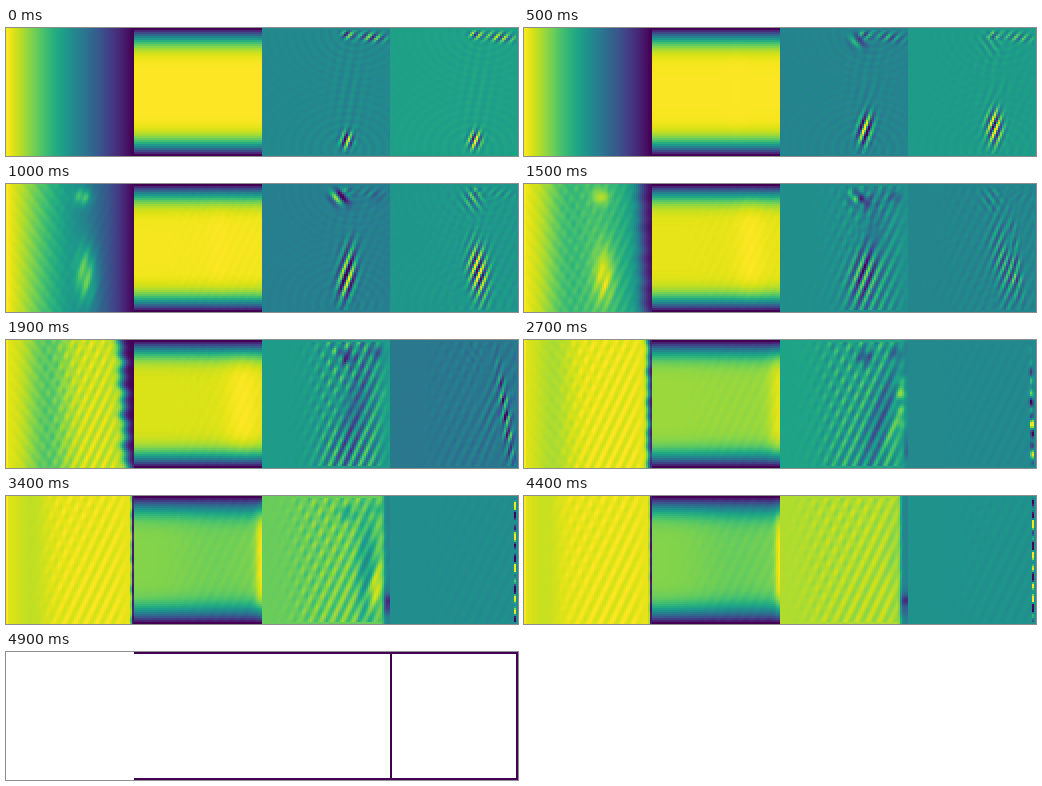
A matplotlib script for the animation above (5 s loop, 512 px wide and 128 px high).

```python
import numpy as np
import matplotlib.pyplot as plt
from matplotlib.animation import FuncAnimation

N = 64
FRAMES, INTERVAL = 50, 100
KEY_TIMES = [0, 1, 1.9, 2.7, 3.4, 4.4]
Y, X = np.mgrid[0:N, 0:N].astype(float)
WALL = np.minimum(Y, N - 1 - Y)
INNER = np.clip(WALL, 0, 1) * np.clip(np.minimum(X, N - 1 - X), 0, 1)


def key(t, *values):
    return np.interp(t, KEY_TIMES, values)


def blob(cx, cy, sx, sy, lean=0.0):
    across = (X - cx + lean * (Y - cy)) / sx
    return np.exp(-across**2 - ((Y - cy) / sy) ** 2)


def stripes(period, lean, phase=0.0):
    return np.sin(2 * np.pi * (X + lean * Y) / period + phase)


def step(edge, width):
    return 1 / (1 + np.exp(-np.clip((X - edge) / width, -40, 40)))


def erf_like(d):
    return np.tanh(1.128 * d + 0.1 * d**3)


def wobble(t):
    """Irregular variation down the rows, between about -1 and 1."""
    return 0.5 * (np.sin(0.37 * Y + 2 * t) + np.sin(0.83 * Y - t + 1))


def ripples(t):
    """Weak arcs from the two disturbed spots, and upright fringes between."""
    low = np.hypot(X - 42, 1.3 * (Y - 60))
    high = np.hypot(X - 46, 1.3 * (Y - 2))
    return (np.sin(1.3 * low - 2 * t) * np.exp(-low / 22)
            + np.sin(1.4 * high - 2 * t) * np.exp(-high / 20)
            + stripes(5, 0.2, -t) * blob(43, 32, 9, 28))


def streaks(t):
    """Long leaning lines that break into dots upstream and near the top."""
    main = stripes(key(t, 4.5, 4.5, 5, 5.2, 5.4, 5.6), 0.48, -1.2 * t)
    cross = stripes(8, -0.8, 0.8 * t)
    dotted = 1 - 0.85 * step(38 - 0.5 * (Y - 32), 5)
    return main * (1 - 0.4 * dotted * (1 - cross))


def pressure(t):
    start = 1 - X / (N - 1)
    edge = key(t, 60, 58, 58.5, 61.8, 62.4, 62.5)
    edge = edge + key(t, 0, 0, 1.2, 0.5, 0.2, 0.1) * wobble(t) \
        + key(t, 0, 0, 0.05, 0, 0, 0) * (Y - 32)
    dip = key(t, 0.3, 0.3, 0.22, 0.09, 0.06, 0.05) * np.exp(
        -((X - key(t, 22, 22, 20, 14, 12, 10)) / key(t, 10, 10, 11, 10, 9, 8)) ** 2)
    late = (0.965 - dip) * (1 - step(edge, key(t, 3, 3, 1.2, 0.7, 0.25, 0.2)))
    mix = np.interp(t, [0.9, 1.4, 1.9, 2.7], [0, 0.45, 0.94, 1])
    field = start + mix * (late - start)
    grow = np.interp(t, [0.6, 0.8, 1, 1.4, 1.9], [0, 0.1, 0.38, 0.35, 0])
    spot = blob(39.5, 45, 5, 14, 0) + 0.8 * blob(38, 6, 4, 4)
    field = field + grow * spot * (0.9 + 0.2 * stripes(5, 0.35, -t))
    faint = np.interp(t, [0.6, 1, 1.9, 2.7, 3.4], [0, 0.018, 0.02, 0.008, 0])
    field += faint * stripes(6, -0.8, t) * np.exp(-((X - 18) / 14) ** 2)
    amp = np.interp(t, [0.8, 1.9, 2.7, 3.4, 4.4], [0, 0.06, 0.04, 0.035, 0.035])
    field += amp * streaks(t) * step(20, 3) * (1 - step(edge - 5, 1.5))
    return np.where(X == 0, 1, field)


def stream(t):
    core = key(t, 1, 0.985, 0.945, 0.85, 0.815, 0.815)
    width = key(t, 9.5, 9.5, 9.3, 9.2, 9.5, 9.5)
    width = width + key(t, 0, 0, 0.3, 0.6, 1.2, 1.5) * X / N
    sag = key(t, 0, 0, 0, 0.005, 0.03, 0.045) * np.exp(-((X - 42) / 20) ** 2)
    bright = key(t, 0, 0.008, 0.05, 0.11, 0.17, 0.18) * np.exp(
        -((X - key(t, 42, 42, 54, 63, 63, 63)) / key(t, 5, 5, 9, 5, 2.8, 2)) ** 2)
    field = (core - sag + bright) * erf_like(WALL / width)
    amp = np.interp(t, [0.6, 1, 2.7, 4.4], [0, 0.005, 0.008, 0.011])
    return field + amp * streaks(t) * step(20, 4) * INNER


def cross_flow(t):
    base = key(t, 0.47, 0.43, 0.55, 0.58, 0.77, 0.88)
    cy, sy = key(t, 55.5, 45, 36, 34, 34, 34), key(t, 4.5, 14, 25, 28, 28, 28)
    packet = blob(42, cy, key(t, 3.4, 4.5, 9, 9, 9, 9), sy, 0.12)
    f = key(t, 0.58, 0.6, 0.12, 0, 0, 0) * packet * stripes(
        key(t, 4, 4.6, 5, 5, 5, 5), 0.4, -1.2 * t)
    f += key(t, 0.42, 0.12, 0, 0, 0, 0) * (
        blob(54, 4, 8, 2.5, -0.8) + blob(42, 3, 3, 2)) * stripes(5, 0.9, -2 * t)
    f += key(t, 0, 0.5, 0.1, 0, 0, 0) * blob(38, 6, 4.5, 4) * stripes(8, -0.8, 2.2)
    f += key(t, 0.04, 0.03, 0.012, 0.01, 0, 0) * ripples(t)

    # Wide streaks take over, then a dark band drifts to the outlet.
    spread = step(key(t, 36, 34, 28, 22, 17, 14), 4) * (1 - step(58, 2))
    f += key(t, 0, 0.02, 0.24, 0.17, 0.1, 0.055) * streaks(t) * spread
    band = blob(key(t, 42, 42, 46, 50, 52, 56), key(t, 32, 32, 36, 38, 38, 38),
                key(t, 4, 4, 6, 5.5, 4.5, 3), 28, key(t, 0.2, 0.2, 0.2, 0.28, 0, 0))
    f -= key(t, 0, 0, 0.2, 0.22, 0.24, 0.05) * band
    f -= key(t, 0, 0.12, 0.32, 0.3, 0.15, 0) * (
        blob(42, 8, 4, 4) + 0.7 * blob(57, 6, 3, 3))
    f += key(t, 0, 0, 0.06, 0.3, 0.05, 0) * blob(60, 29, 2.5, 13) * (
        0.6 + 0.6 * wobble(t))
    f += key(t, 0, 0, 0, 0.12, 0.28, 0.04) * blob(55.5, 46, 3, 10, 0.2)
    f *= np.clip(WALL, 0, 1) * np.clip(X, 0, 1)
    outlet = step(key(t, 63, 63, 63, 61.5, 60.4, 59.8), 0.4)
    f -= outlet * (key(t, 0, 0, 0, 0.1, 0.32, 0.43)
                   + key(t, 0, 0, 0, 0.2, 0.38, 0.35)
                   * blob(62, 53, 6, 5) * (0.8 + 0.3 * wobble(t)))
    return base + f


def divergence(t):
    base = key(t, 0.57, 0.53, 0.4, 0.47, 0.49, 0.51)
    packet = blob(key(t, 42, 43.5, 50, 55, 58, 60), key(t, 55.5, 43, 36, 34, 34, 34),
                  key(t, 3.4, 5, 6, 6, 5, 5), key(t, 4.5, 14, 25, 28, 28, 28),
                  key(t, 0.12, -0.1, -0.1, 0, 0, 0))
    f = key(t, 0.6, 0.58, 0.06, 0, 0, 0) * packet * stripes(
        key(t, 3.7, 3.9, 4, 4, 4, 4), 0.45, -1.5 * t)
    f += key(t, 0.4, 0.1, 0, 0, 0, 0) * (
        blob(54, 4, 8, 2.5, -0.8) + blob(42, 3, 3, 2)) * stripes(4.6, 0.9, -2 * t)
    f += key(t, 0, 0.25, 0.03, 0, 0, 0) * blob(41, 7, 5, 6) * stripes(4.5, -0.7, 1)
    f += key(t, 0.025, 0.025, 0.01, 0, 0, 0) * ripples(t)
    f += key(t, 0, 0.02, 0.045, 0.014, 0.012, 0.012) * streaks(t) * step(22, 4)

    # The remaining disturbance collapses into the outlet column.
    front = blob(key(t, 45, 48, 57.5, 61.5, 62, 62), key(t, 40, 40, 38, 42, 32, 32),
                 key(t, 4, 4, 2.8, 0.9, 0.5, 0.45), key(t, 20, 20, 24, 26, 90, 200),
                 key(t, 0, 0, -0.13, -0.02, 0, 0))
    texture = stripes(3.6, 0.3, -t) * (0.75 + 0.25 * np.sin(0.7 * Y))
    settle = key(t, 0, 0, 0.1, 0.8, 1, 1)
    f += key(t, 0, 0.03, 0.5, 0.7, 0.75, 0.75) * front * (
        (1 - settle) * texture + settle * 1.4 * wobble(t))
    return base + f * INNER


def blown_up():
    p, u, v, d = (np.full((N, N), np.nan) for _ in range(4))
    for field in (u, v, d):
        field[[0, -1], :] = 0
    d[:, [0, -1]] = 0
    return np.hstack([p, u, v, d])


def scene(i):
    if i == FRAMES - 1:
        return blown_up()
    t = i * INTERVAL / 1000
    fields = [pressure(t), stream(t), cross_flow(t), divergence(t)]
    return np.clip(np.hstack(fields), 0, 1)


fig = plt.figure(figsize=(5.12, 1.28), dpi=100, facecolor="white")
ax = fig.add_axes([0, 0, 1, 1])
ax.axis("off")
image = ax.imshow(scene(0), cmap="viridis", vmin=0, vmax=1,
                  interpolation="nearest", aspect="auto")


def update(i):
    image.set_data(np.ma.masked_invalid(scene(i)))
    return [image]


anim = FuncAnimation(fig, update, frames=FRAMES, interval=INTERVAL,
                     repeat=True, repeat_delay=0)
plt.show()
```
